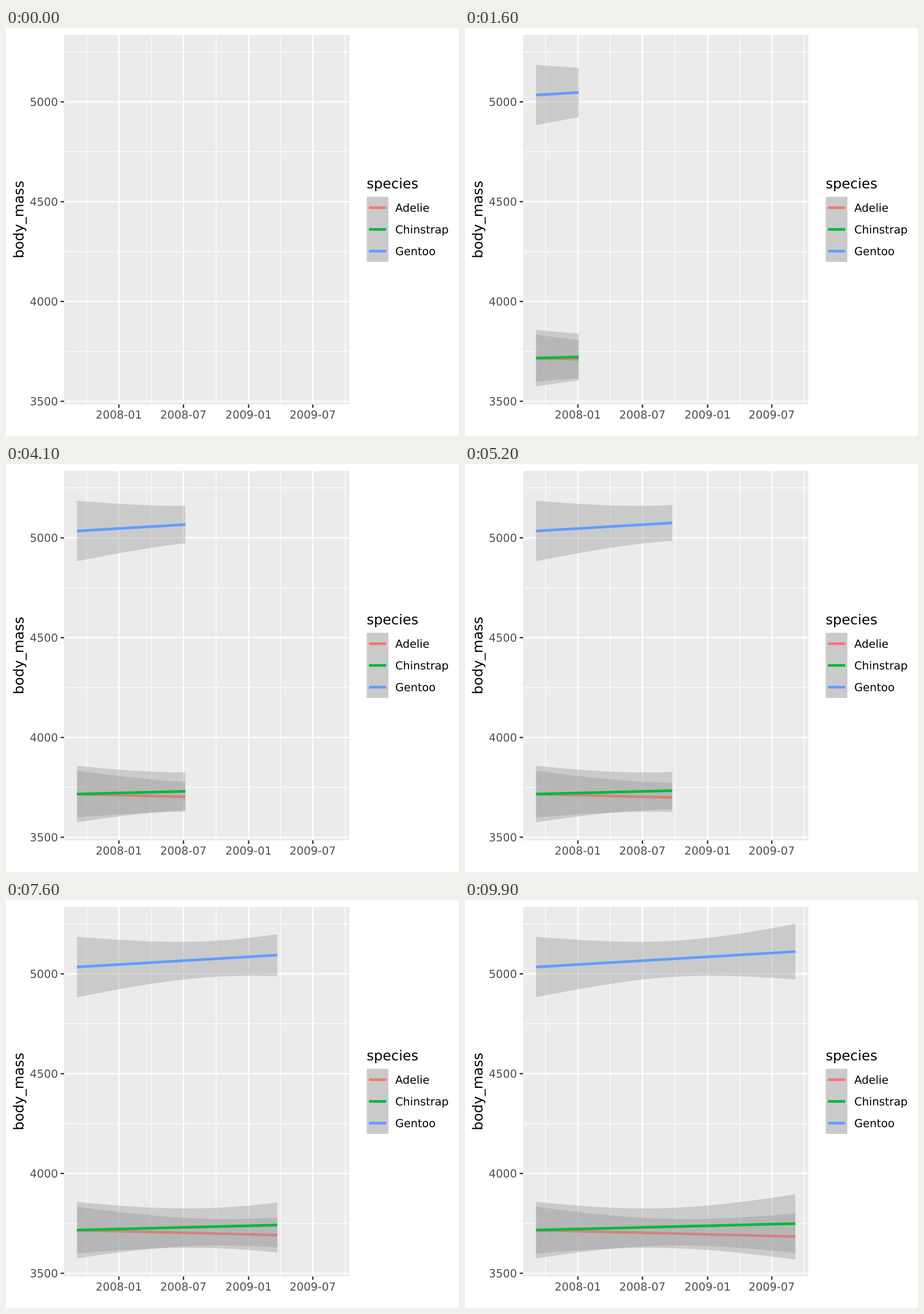
A matplotlib script for the animation above (10 s loop, 789x710 px).

```python
import numpy as np
import matplotlib.pyplot as plt
from matplotlib.animation import FuncAnimation
from matplotlib.patches import PathPatch, Polygon, Rectangle
from matplotlib.textpath import TextPath
from matplotlib.transforms import Affine2D

W, H, DPI = 789, 710, 72          # at 72 dpi one point is one pixel
FRAMES, INTERVAL = 100, 100
POINTS = 80                       # samples along each fitted line

plt.rcParams.update({
    "font.family": "DejaVu Sans",
    "path.snap": False,
    "lines.solid_capstyle": "butt",
})

LEFT, RIGHT, TOP, BOTTOM = 101.2, 598, 12, 655
X0, X1 = 123.7, 575.4             # extent of the data
SMALL, LARGE = 19.3, 24.1         # font sizes
MAJOR, MINOR, THICK = 2.33, 1.16, 4.6
AXIS_INK, TICK_INK = "#4D4D4D", "#333333"

# name, colour, line start and end, band: h^2 = a + b (u - c)^2
SPECIES = [
    ("Adelie", "#F8766D", (574.5, 585.7), (645, 3950, 0.5082)),
    ("Chinstrap", "#00BA38", (574.4, 563.1), (1058, 5806, 0.4845)),
    ("Gentoo", "#619CFF", (116.6, 89.8), (982, 6271, 0.535)),
]

fig = plt.figure(figsize=(W / DPI, H / DPI), dpi=DPI, facecolor="white")
ax = fig.add_axes([0, 0, 1, 1])
ax.set(xlim=(0, W), ylim=(H, 0))
ax.axis("off")


def box(x0, y0, x1, y1, color):
    ax.add_patch(Rectangle((x0, y0), x1 - x0, y1 - y0, fc=color, lw=0, zorder=1))


def line(xs, ys, color, width, z=2):
    return ax.plot(xs, ys, color=color, lw=width, zorder=z)[0]


def label(x, y, s, size=SMALL, color="black", align="left", angle=0):
    """Text outline with its baseline at y, free of pixel rounding."""
    path = TextPath((0, 0), s, size=size)
    ink = path.get_extents()
    anchor = {"left": 0, "center": (ink.x0 + ink.x1) / 2, "right": ink.x1}[align]
    place = (Affine2D().translate(-anchor, 0).rotate_deg(angle)
             .scale(1, -1).translate(x, y))
    ax.add_patch(PathPatch(place.transform_path(path), fc=color, lw=0, zorder=2))


def draw_panel():
    box(LEFT, TOP, RIGHT, BOTTOM, "#EBEBEB")
    x_ticks = {"2008-01": 196.6, "2008-07": 309.1, "2009-01": 422.6, "2009-07": 534.4}
    y_ticks = {str(v): 128.5 + (5000 - v) * 0.3474 for v in (5000, 4500, 4000, 3500)}

    for x in (140.4, 252.9, 365.9, 478.5, 590.8):
        line([x, x], [TOP, BOTTOM], "white", MINOR)
    for y in y_ticks.values():
        line([LEFT, RIGHT], [y - 86.85] * 2, "white", MINOR)
    for s, x in x_ticks.items():
        line([x, x], [TOP, BOTTOM], "white", MAJOR)
        line([x, x], [BOTTOM, BOTTOM + 6], TICK_INK, MAJOR)
        label(x - 0.3, 679.7, s, color=AXIS_INK, align="center")
    for s, y in y_ticks.items():
        line([LEFT, RIGHT], [y, y], "white", MAJOR)
        line([LEFT - 6, LEFT], [y, y], TICK_INK, MAJOR)
        label(89.3, y + 7, s, color=AXIS_INK, align="right")
    label(30.4, 332.8, "body_mass", LARGE, align="center", angle=90)


def draw_legend():
    label(628.2, 279, "species", LARGE)
    box(628.3, 293.7, 666, 407, "#CACACA")
    for i, (name, color, *_) in enumerate(SPECIES):
        y = 312.7 + 37.8 * i
        line([632.1, 662.2], [y, y], color, THICK)
        label(678, y + 7, name)


def make_fit(i, color):
    band = Polygon([(X0, 0)] * 3, fc="#999999", alpha=0.4, lw=0, zorder=3 + 2 * i)
    ax.add_patch(band)
    return band, line([], [], color, THICK, 4 + 2 * i)


draw_panel()
draw_legend()
fits = [make_fit(i, sp[1]) for i, sp in enumerate(SPECIES)]

# Each sample lands on its nearest frame; skipped frames fall midway.
steps = np.arange(POINTS)
landing = np.round(steps * (FRAMES - 1) / (POINTS - 1))


def update(frame):
    reach = np.interp(frame, landing, steps)
    u = np.append(steps[steps < reach], reach) / (POINTS - 1)
    x = X0 + (X1 - X0) * u
    for (band, stroke), (_, _, (start, end), (a, b, c)) in zip(fits, SPECIES):
        y = start + (end - start) * u
        half = np.sqrt(a + b * (u - c) ** 2)
        band.set_xy(np.column_stack([np.r_[x, x[::-1]],
                                     np.r_[y - half, (y + half)[::-1]]]))
        stroke.set_data(x, y)
        band.set_visible(frame > 0)
        stroke.set_visible(frame > 0)
    return [artist for fit in fits for artist in fit]


anim = FuncAnimation(fig, update, frames=FRAMES, interval=INTERVAL,
                     init_func=lambda: update(0), repeat=True, repeat_delay=0)
plt.show()
```
